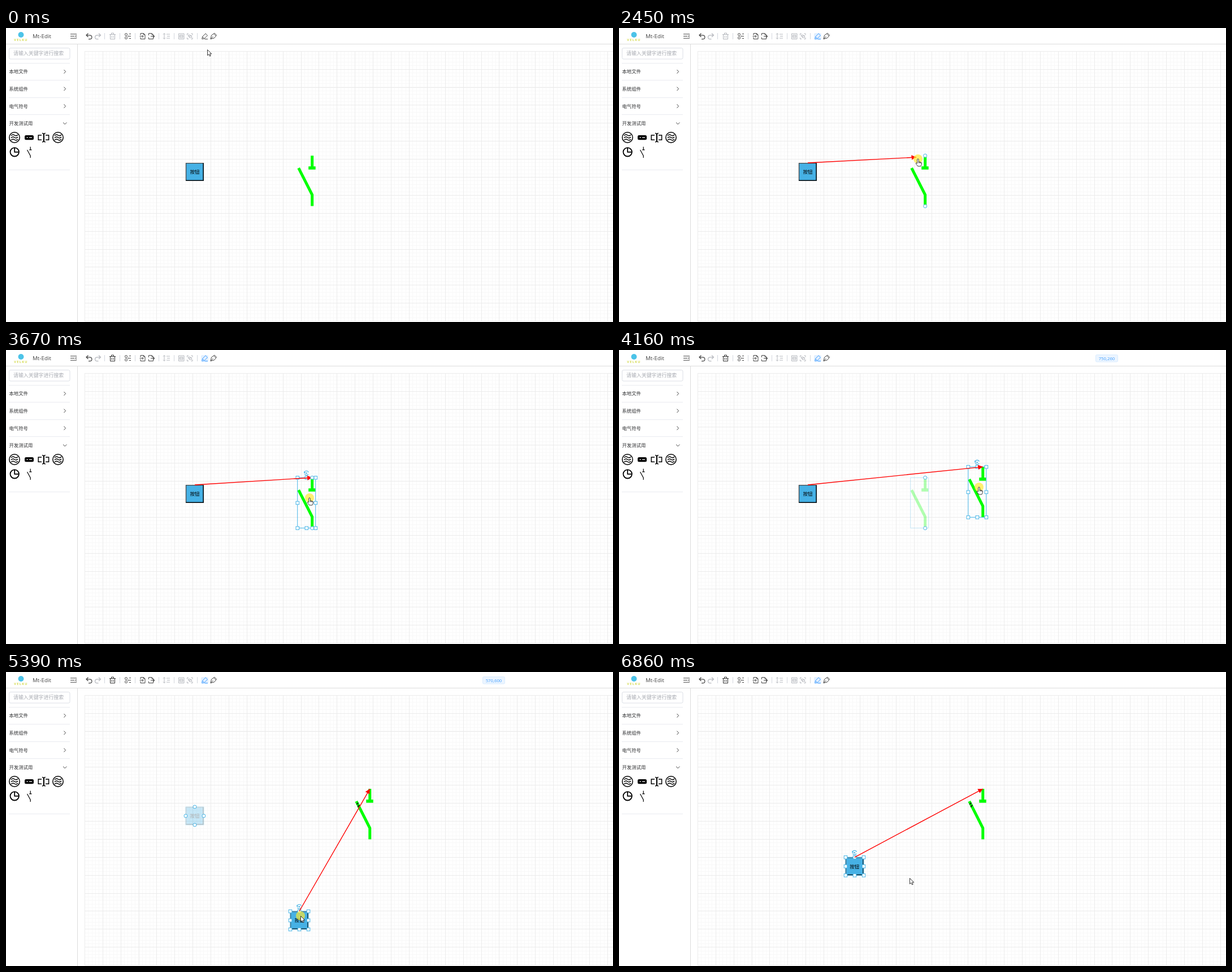
Animation of 1074x521 px, one loop 6990 ms. Source, as an HTML page:

```html
<!DOCTYPE html>
<html lang="zh">
<head>
<meta charset="utf-8">
<title>Diagram editor</title>
<style>
  html, body { margin: 0; width: 100%; height: 100%; overflow: hidden; background: #fff; }
  svg { display: block; }
  text { font-family: "Noto Sans CJK SC", "Noto Sans CJK", sans-serif; }
  .latin { font-family: "Open Sans", "Noto Sans", sans-serif; }
  .crisp { shape-rendering: crispEdges; }
  .icon { fill: none; stroke: #444; stroke-width: 1; }
  .off { stroke: #b4b7bd; }
  .part { fill: none; stroke: #000; stroke-width: 1.5; }
  .frame { fill: none; stroke: #46b4e6; }
  .handle { fill: #fff; stroke: #46b4e6; }
</style>
</head>
<body>
<svg width="1074" height="521" viewBox="0 0 1074 521">
  <defs>
    <g id="switch" fill="none" stroke="#0f0" stroke-width="5">
      <path d="M26 0V22M2 22L26 69.5V89.3"/>
      <path d="M19.5 21.8H32" stroke-width="5.6"/>
    </g>
    <g id="button">
      <path fill="#46b1e5" d="M0 0H32V32H0Z"/>
      <path fill="none" stroke="#4a4a4a" stroke-width="1.3" d="M.6 31.5V.6H31.5"/>
      <path fill="none" stroke="#000" stroke-width="1.5" d="M.3 31.2H31.2V.3"/>
      <text x="16" y="19.3" font-size="8.5" text-anchor="middle">按钮</text>
    </g>
    <g id="waves" class="part">
      <circle r="9.2"/>
      <path id="wave" d="M-6 -3.2q3-3 6-.8t6-.8"/>
      <use href="#wave" y="4"/><use href="#wave" y="8"/>
    </g>
    <g id="document">
      <path d="M-4 -1.5V-5H1.5L4 -2.5V5H-4V2M1.5 -5V-2.5H4"/>
    </g>
    <marker id="arrowhead" viewBox="0 0 8 8" markerWidth="8.5" markerHeight="8.5" refX="8" refY="4"
      orient="auto" markerUnits="userSpaceOnUse"><path d="M0 0L8 4 0 8Z" fill="red"/></marker>
  </defs>

  <g class="crisp" fill="none">
    <path id="fineGrid" stroke="#f8f8f8"/>
    <path id="mainGrid" stroke="#ebebeb"/>
    <path stroke="#dcdcdc" d="M0 28.5H1074M126.5 28V521"/>
    <path stroke="#e9ebf0" d="M5 62.5H113M5 92.5H113M5 123.5H113M5 153.5H113M5 251.5H113"/>
    <path stroke="#d4d7de" d="M174.5 9V20M201.5 9V20M228.5 9V20M270.5 9V20M297.5 9V20M338.5 9V20"/>
  </g>

  <!-- header -->
  <circle cx="26.5" cy="12" r="5" fill="#4cc3e8"/>
  <text class="latin" x="26.5" y="23" font-size="5.5" font-weight="700" letter-spacing="1.4" text-anchor="middle" fill="#d3d94a">VELKU</text>
  <text class="latin" x="47" y="18" font-size="9.8" fill="#444">Mt-Edit</text>
  <g class="icon">
    <path d="M114 10.8H125M114 14.5H121M114 18.2H125M125 12.8L122.5 14.5 125 16.2"/>
    <path id="undo" d="M145.5 9.5L142 12.8 145.5 16M142 12.8H148.5a3.4 3.4 0 010 6.8H146" stroke-width="1.2"/>
    <g class="off">
      <use href="#undo" transform="matrix(-1 0 0 1 309.5 0)" style="stroke:#b4b7bd"/>
    </g>
    <path d="M218 10.5H221M215 14.5H221M218 18.5H221" stroke-width="1.2"/>
    <circle cx="212.5" cy="11.5" r="2"/><circle cx="212.5" cy="17.5" r="2"/>
    <use href="#document" x="242" y="14.5"/><path d="M236.5 14.8H243M240.8 12.5L243 14.8 240.8 17"/>
    <use href="#document" x="256.5" y="14.5"/><path d="M256 14.8H263M260.6 12.5L263 14.8 260.6 17"/>
    <path class="off" d="M280 9.5V19.5M278 11.5L280 9.5 282 11.5M278 17.5L280 19.5 282 17.5M284 11H290M285 14.5H290M284 18H290"/>
    <path class="off" d="M305.5 10H315V19.5H305.5ZM307.5 12.5H313V17H307.5ZM307.5 14.8H313"/>
    <path class="off" d="M320.5 12.5V10H323M327.5 10H330V12.5M330 17V19.5H327.5M323 19.5H320.5V17M322.5 12.5H326V15H322.5ZM324.5 15V17H328.5V13.5H326"/>
    <path d="M362 19.5L363.5 13 367.5 10 371.5 14 368.5 17.8ZM362 19.5L366.5 15M367.5 10L368.8 9 372.5 12.8 371.5 14"/>
  </g>
  <path id="trash" class="icon" d="M183 11.5H194M186.5 11V9H190.5V11M184.5 11.5V19.8H192.5V11.5M187 14V17.5M190 14V17.5"/>
  <g id="pencil" class="icon">
    <rect id="pencilBack" x="345" y="9" width="13" height="12" rx="2" fill="#e3f0ff" stroke="none"/>
    <path d="M346.8 19.5L347.5 15.5 353 9.8 356.5 13.2 351 18.8ZM347.5 15.5L351 18.8M351.5 19.7H357"/>
  </g>
  <g id="tag">
    <rect x="843.5" y="8.5" width="39" height="12.5" rx="2" fill="#ecf5ff" stroke="#d9ecff"/>
    <text id="tagText" class="latin" x="863" y="17.6" font-size="7.8" text-anchor="middle" fill="#409eff"></text>
  </g>

  <!-- side panel -->
  <rect x="5.5" y="35.5" width="107.5" height="19.5" rx="2.5" fill="#fff" stroke="#dcdfe6"/>
  <text x="13" y="48.3" font-size="8.93" fill="#a8abb2">请输入关键字进行搜索</text>
  <g font-size="8.4" fill="#303133">
    <text x="5.5" y="80.2">本地文件</text>
    <text x="5.5" y="110.8">系统组件</text>
    <text x="5.5" y="141.5">电气符号</text>
    <text x="5.5" y="172">开发测试用</text>
  </g>
  <path class="icon" d="M102.5 74l3 3.3-3 3.3M102.5 104.5l3 3.3-3 3.3M102.5 135.2l3 3.3-3 3.3M101 167.5l3.2 3 3.2-3"/>
  <use href="#waves" x="15" y="194"/>
  <use href="#waves" x="92" y="194"/>
  <rect x="33" y="190" width="16" height="8.3" rx="2.5"/>
  <path stroke="#fff" stroke-width="1.2" d="M36.5 194.1h2.4M41 194.1h5"/>
  <g class="part">
    <path d="M63 190H57.2V198.3H63M70 190H75.6V198.3H70M64 186.5q2.6 0 2.6 2V200q0 2-2.6 2M69.8 186.5q-2.6 0-2.6 2V200q0 2 2.6 2"/>
    <circle cx="15.2" cy="219.8" r="7.7" stroke-width="1.8"/>
    <path d="M15.2 212V219.8H23" stroke-width="1.8"/>
    <path d="M43.2 210.5V215.8M41.2 215.8H45.5M37.5 216L43.2 226.5V230" stroke-width="1.2"/>
  </g>

  <!-- diagram -->
  <g id="ghostSwitch"><g opacity=".3"><use href="#switch"/><path class="frame" d="M0 0H32V89.3H0Z"/></g></g>
  <g id="ghostButton"><g opacity=".3"><use href="#button"/><path class="frame" d="M0 0H32V32H0Z"/></g></g>
  <g id="liveButton"><use href="#button"/><g id="buttonSelection"></g></g>
  <g id="liveSwitch">
    <use href="#switch"/>
    <path id="scuff" stroke="#111" stroke-width="1.8" d="M2.5 27.5L5.5 24.5M4.5 32.5L7.5 28.5"/>
    <g id="switchSelection"></g>
  </g>
  <path id="link" fill="none" stroke="red" stroke-width="1.4" marker-end="url(#arrowhead)"/>
  <g id="switchAnchors"></g>
  <g id="buttonAnchors"></g>

  <g id="cursor">
    <circle id="press" r="8" fill="#ffe92e" opacity=".68"/>
    <g fill="#fff" stroke="#222" stroke-width=".9" stroke-linejoin="round">
      <path id="arrow" d="M.5 .5V10.6L2.9 8.5 4.5 12 6.2 11.3 4.7 7.8H7.8Z"/>
      <path id="hand" d="M-1.3 8V1.3a1.3 1.3 0 012.6 0V5.2L5 5.9q1.6.5 1.5 2L6 10.5 4.8 13H-.2L-3.6 8.6q-.6-1.2.5-1.5L-1.3 8M1.3 5.2V7.5M3.2 5.6V7.6M5 6V7.8"/>
    </g>
  </g>
</svg>

<script>
const LOOP = 6990, SCALE = 0.638, ORIGIN = [139.3, 41.2], SIZE = 32;
const el = id => document.getElementById(id);

// Each move: start, end, number of steps, x, y
const cursorMoves = [
  [120, 400, 5, 350, 18], [810, 1430, 10, 334, 241], [1900, 2450, 9, 529, 232],
  [2520, 2520, 1, 537, 228], [2610, 2860, 4, 541, 233], [3260, 3540, 5, 537, 262],
  [3740, 4160, 7, 637, 243], [4370, 4910, 9, 336, 246], [5050, 5390, 6, 521, 432],
  [5650, 5790, 3, 419, 336], [5990, 6270, 5, 514, 365]
];
const items = {
  Switch: { home: [590, 290], height: 89.3, moves: [[3740, 4160, 7, 750, 260]],
    drag: [3740, 4300], selected: [3600, 4980], anchors: [[26, 0], [26, 89.5]] },
  Button: { home: [280, 310], height: 32, moves: [[5050, 5390, 6, 570, 600], [5650, 5790, 3, 410, 450]],
    drag: [5050, 5990], selected: [4980, LOOP], anchors: [[16, 0], [0, 16], [32, 16], [16, 32]] }
};
const presses = [[670, 810], [1900, 2520], [3600, 4300], [4980, 5990]];

const within = (t, [from, to]) => t >= from && t < to;
const show = (id, on) => el(id).style.display = on ? "" : "none";
const place = (id, [x, y]) => el(id).setAttribute("transform", `translate(${x} ${y})`);
const toStage = point => point.map((v, i) => ORIGIN[i] + v * SCALE);

function progress(t, start, end, steps) {
  if (t < start) return 0;
  if (t >= end) return 1;
  const p = (Math.floor((t - start) / (end - start) * (steps - 1) + 0.05) + 1) / steps;
  return p * p * (3 - 2 * p);
}

function track(t, from, moves) {
  let [x, y] = from;
  for (const [start, end, steps, toX, toY] of moves) {
    const p = progress(t, start, end, steps);
    x += (toX - x) * p;
    y += (toY - y) * p;
  }
  return [x, y];
}

function gridPath(step) {
  let d = "";
  for (let x = ORIGIN[0]; x < 1074; x += step) d += `M${Math.floor(x) + .5} 41V520`;
  for (let y = ORIGIN[1]; y < 520; y += step) d += `M139 ${Math.floor(y) + .5}H1074`;
  return d;
}

function selectionMarkup(height) {
  let markup = `<path class="frame" d="M0 0H${SIZE}V${height}H0Z"/>`;
  for (const x of [0, .5, 1]) for (const y of [0, .5, 1]) {
    if (x === .5 && y === .5) continue;
    markup += `<rect class="handle" x="${x * SIZE - 2.7}" y="${y * height - 2.7}" width="5.6" height="5.6"/>`;
  }
  return markup + `<path class="frame" stroke-width="1.2" d="M12 -11V-8.5H14.5M12.2 -9.5a4 4 0 017.4 0M12.5 -6.5a4 4 0 006.8 .4"/>
    <circle cx="16" cy="-8" r="1.2" fill="#46b4e6"/>`;
}

el("fineGrid").setAttribute("d", gridPath(10 * SCALE));
el("mainGrid").setAttribute("d", gridPath(50 * SCALE));
for (const [name, item] of Object.entries(items)) {
  el(name.toLowerCase() + "Selection").innerHTML = selectionMarkup(item.height);
  el(name.toLowerCase() + "Anchors").innerHTML =
    item.anchors.map(([x, y]) => `<circle class="handle" cx="${x}" cy="${y}" r="3"/>`).join("");
  place("ghost" + name, toStage(item.home));
}

function render(t) {
  const [cx, cy] = track(t, [356, 38], cursorMoves);
  const drawing = within(t, [1900, 2610]);
  const corner = {}, hovered = {};
  let label = "";

  for (const [name, item] of Object.entries(items)) {
    const units = track(t, item.home, item.moves).map(v => Math.round(v / 10) * 10);
    const [x, y] = corner[name] = toStage(units);
    const dragging = within(t, item.drag), key = name.toLowerCase();
    hovered[name] = cx >= x && cx <= x + SIZE && cy >= y && cy <= y + item.height;
    if (dragging) label = units.join();
    place("live" + name, [x, y]);
    place(key + "Anchors", dragging ? toStage(item.home) : [x, y]);
    show("ghost" + name, dragging);
    show(key + "Selection", within(t, item.selected));
    show(key + "Anchors", dragging || hovered[name] && !(drawing && name === "Button"));
  }

  const [bx, by] = corner.Button, [sx, sy] = corner.Switch;
  const tip = drawing ? [cx - 3, cy - 3] : [sx + 26, sy];
  el("link").setAttribute("d", `M${bx + 16} ${by}L${tip}`);
  show("link", t >= 1900);
  show("scuff", t >= 4400);

  show("tag", label);
  el("tagText").textContent = label;
  el("trash").style.stroke = t >= 3600 ? "#333" : "#b4b7bd";
  el("pencil").style.stroke = t >= 810 ? "#409eff" : "#444";
  show("pencilBack", t >= 810);

  const pointing = cy < 28 || hovered.Switch;
  place("cursor", [cx, cy]);
  show("press", presses.some(span => within(t, span)));
  show("hand", pointing);
  show("arrow", !pointing);
}

function tick() {
  render(performance.now() % LOOP);
  requestAnimationFrame(tick);
}
tick();
</script>
</body>
</html>
```
